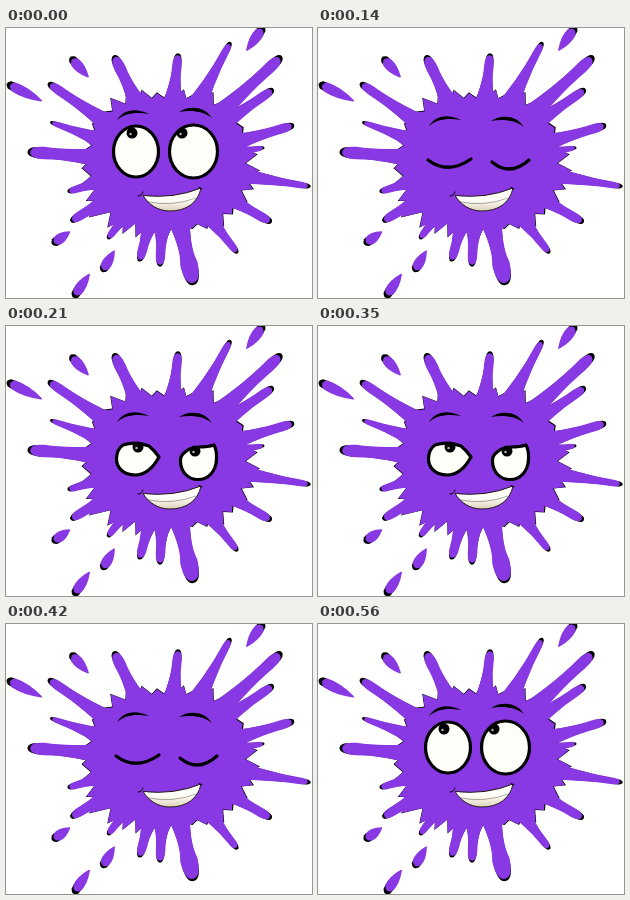
Write an HTML page that moves like this. It is 306 px wide and 270 px high and loops after 0.63 s.

```html
<!DOCTYPE html>
<html lang="en">
<head>
<meta charset="utf-8">
<title>Blinking splat</title>
<style>
  html, body { margin: 0; width: 100%; height: 100%; overflow: hidden; background: #fff; }
  svg { display: block; width: 306px; height: 270px; }
  .line { fill: none; stroke: #000; stroke-linecap: round; }
  .eye { fill: #fffffa; stroke: #000; stroke-width: 3.2; stroke-linejoin: round; }
</style>
</head>
<body>
<svg viewBox="0 0 306 270">
  <defs>
    <linearGradient id="teeth" x2="0" y2="1">
      <stop offset=".5" stop-color="#fffffa"/>
      <stop offset="1" stop-color="#ded2b8"/>
    </linearGradient>
    <g id="splat" stroke-width="1.5" stroke-linejoin="round"></g>
    <path id="brow-l" d="M111 96C117 86 129 83 143 90C129 88 120 89 111 96Z"/>
    <path id="brow-r" d="M173 91C183 84 199 85 206 97C197 90 185 89 173 91Z"/>
    <g id="pupil"><circle r="5.500"/><circle cx="-1.500" cy="1" r="1.200" fill="#bbb"/></g>
  </defs>
  <use href="#splat" fill="#000" transform="translate(160 135) scale(1.026)"/>
  <use href="#splat" fill="#8939e3" stroke="#8939e3" transform="translate(160 135)"/>

  <path d="M137 167.500Q168 171 195 160C192 175 180 183 164 183C152 183 143 177 137 167.500Z" fill="url(#teeth)" stroke="#221a1a" stroke-width="1"/>
  <path class="line" stroke-width="1" d="M132 168Q136 168 137 164M193 159.500L196 161"/>
  <path class="line" stroke="#000" stroke-width=".7" opacity=".45" d="M143 174Q166 179 190 170"/>

  <g class="pose">
    <use href="#brow-l" y="-4"/><use href="#brow-r" y="-7"/>
    <ellipse class="eye" cx="130" cy="123.500" rx="22.500" ry="25.500"/>
    <ellipse class="eye" cx="187.500" cy="123.500" rx="24" ry="26.500"/>
    <use href="#pupil" x="126" y="105"/><use href="#pupil" x="176" y="105"/>
  </g>
  <g class="pose">
    <use href="#brow-l"/><use href="#brow-r"/>
    <path class="eye" d="M110.500 132Q111 123 117 119Q130 115 143 120Q149 125 153 131C147 142 139 149 129 149C118 149 110 142 110.500 132Z"/>
    <path class="eye" d="M174.500 136Q174 130 178 127Q184 121 193 121Q202 121 208 119Q211 125 210.500 133C210 145 203 153.500 192 153.500C182 153.500 175 146 174.500 136Z"/>
    <use href="#pupil" x="132" y="121"/><use href="#pupil" x="189" y="125"/>
  </g>
  <g class="pose">
    <use href="#brow-l" y="2"/><use href="#brow-r" y="2"/>
    <path class="line" stroke-width="3.2" d="M110 132Q130 147 153 131M174 134Q192 149 211 132"/>
  </g>
</svg>
<script>
  const CENTER = { x: 160, y: 135 };
  const STEP = 70;
  const BLINK = [0, 1, 2, 1, 0, 1, 2, 1, 0];
  const splat = document.getElementById('splat');
  const poses = [...document.querySelectorAll('.pose')];
  const random = seed => Math.abs(Math.sin(seed * 12.9898) * 43758.5453) % 1;

  function addPath(d, angle = 0) {
    const path = document.createElementNS('http://www.w3.org/2000/svg', 'path');
    path.setAttribute('d', d);
    path.setAttribute('transform', `rotate(${angle})`);
    splat.append(path);
  }

  // Draws a shape along the ray from the centre to its tip.
  function radiate(x, y, shape) {
    const dx = x - CENTER.x, dy = y - CENTER.y;
    addPath(shape(Math.hypot(dx, dy)), Math.atan2(dy, dx) * 180 / Math.PI);
  }

  // A limb narrows from the body, then swells into a rounded bulb.
  function limb([x, y, bulb]) {
    radiate(x, y, tip => {
      const root = 48, neck = (root + tip) / 2, head = tip - 2.4 * bulb;
      return `M${root} -13Q${neck} -3 ${head} ${-bulb}Q${tip} ${-bulb} ${tip} 0` +
        `Q${tip} ${bulb} ${head} ${bulb}Q${neck} 3 ${root} 13Z`;
    });
  }

  function drop([x, y, length]) {
    radiate(x, y, tip => {
      const tail = tip - length, belly = tip - length / 2;
      return `M${tail} 0Q${belly} -6 ${tip - 4} -4Q${tip + 2} 0 ${tip - 4} 4Q${belly} 6 ${tail} 0Z`;
    });
  }

  // Squarish blob with ragged teeth, longest along the bottom.
  function body(teeth) {
    const points = [];
    for (let i = 0; i < teeth * 2; i++) {
      const angle = (i + 0.4 * random(i + 9)) * Math.PI / teeth;
      const c = Math.cos(angle), s = Math.sin(angle);
      const edge = (Math.abs(c / 76) ** 2.5 + Math.abs(s / 63) ** 2.5) ** -0.4;
      const reach = i % 2 ? 4 + (10 + 8 * Math.max(s, 0)) * random(i) : 0;
      points.push(`${(edge + reach) * c + 2} ${(edge + reach) * s - 1}`);
    }
    addPath(`M${points.join('L')}Z`);
  }

  body(34);
  [
    [109, 30, 5], [172, 28, 4], [223, 17, 3], [273, 31, 5], [265, 63, 4], [285, 98, 4],
    [256, 120, 2], [301, 158, 2.5], [263, 193, 4], [230, 223, 3], [187, 254, 8],
    [154, 236, 4], [134, 231, 4], [103, 209, 3], [67, 192, 4], [64, 163, 3],
    [25, 124, 5.5], [47, 95, 2], [45, 57, 4]
  ].forEach(limb);
  [
    [4, 57, 35], [66, 31, 24], [256, 1, 26], [48, 215, 19], [69, 267, 25], [97, 242, 22]
  ].forEach(drop);

  function draw() {
    const pose = BLINK[Math.floor(performance.now() / STEP) % BLINK.length];
    poses.forEach((group, i) => { group.style.display = i === pose ? 'inline' : 'none'; });
    requestAnimationFrame(draw);
  }
  draw();
</script>
</body>
</html>
```
